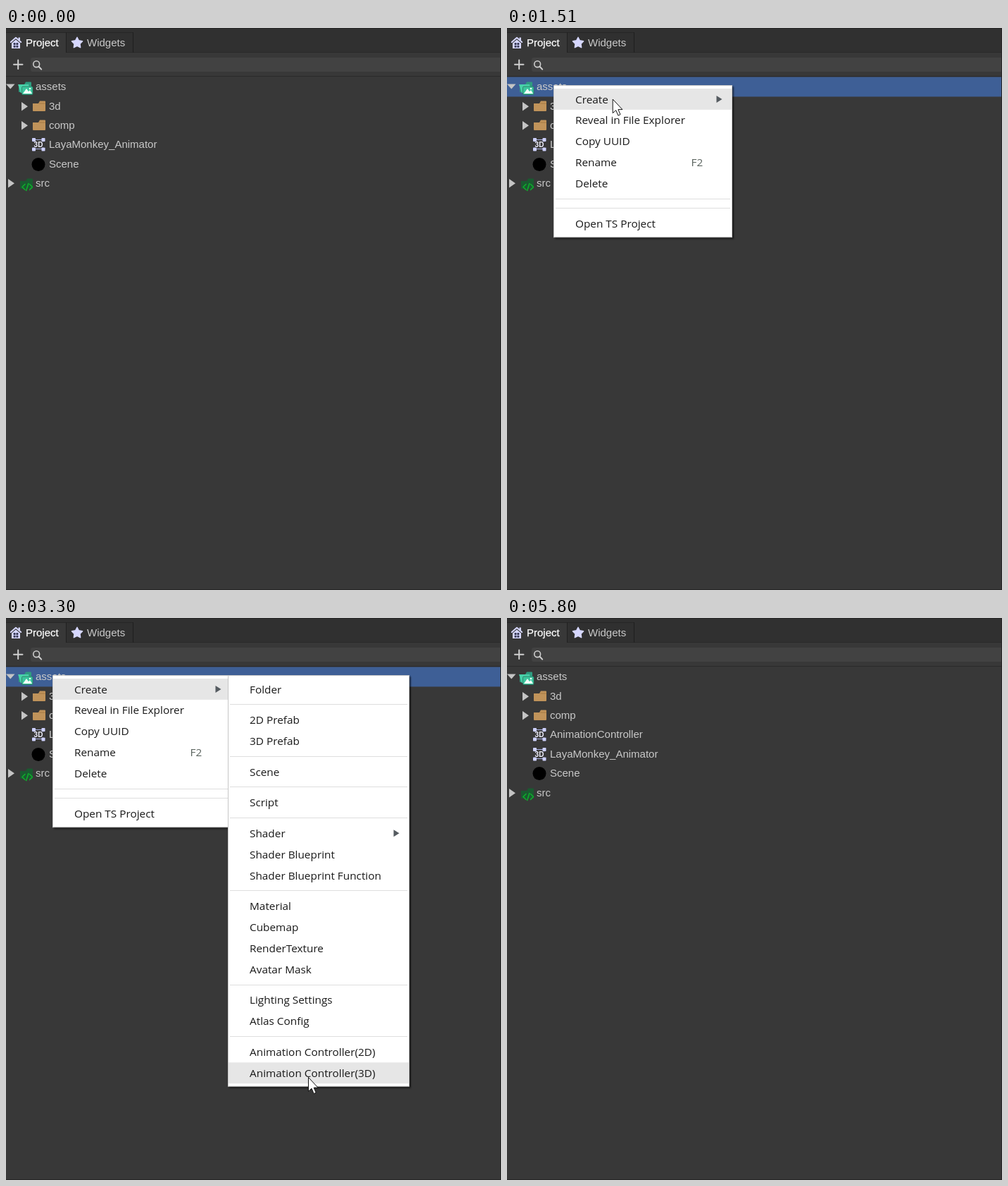
An HTML page for the animation above (6280 ms loop, 703x797 px).

```html
<!DOCTYPE html>
<html lang="en">
<head>
<meta charset="utf-8">
<title>Create an animation controller</title>
<style>
  html, body { margin: 0; width: 100%; height: 100%; overflow: hidden; background: #383838; }
  svg { display: block; }
  .ui { font: 15px "Liberation Sans", Arial, sans-serif; fill: #c9c9c9; }
  .ui .active { fill: #fff; stroke: #fff; stroke-width: .25px; }
  .ui .badge { font-size: 10px; font-weight: bold; fill: #f0f0ff; text-anchor: middle; }
  .menu text { font: 15.35px "Open Sans", "Noto Sans", sans-serif; fill: #1a1a1a; }
  .menu .key { fill: #5b645f; }
  .box { fill: #fff; stroke: #c6c6c6; filter: drop-shadow(2px 2px 1px rgba(0, 0, 0, .55)); }
  .lit { fill: #e6e6e6; }
</style>
</head>
<body>
<svg id="stage" width="703" height="797" viewBox="0 0 703 797"></svg>
<script>
const LOOP = 6280, STEP = 70;
const TOP = 70, ROW = 27.4, ITEM = 29.87, GAP = 13.75;
const LILAC = '#d6d7ff', PALE = '#cfcfcf', BLUE = '#3e5f96';
const stage = document.getElementById('stage');

// --- drawing helpers ---
const rect = (x, y, w, h, fill, extra = '') =>
  `<rect x="${x}" y="${y}" width="${w}" height="${h}" fill="${fill}" ${extra}/>`;
const path = (d, fill, extra = '') => `<path d="${d}" fill="${fill}" ${extra}/>`;
const line = (d, stroke, width) =>
  path(d, 'none', `stroke="${stroke}" stroke-width="${width}" stroke-linecap="round" stroke-linejoin="round"`);
const text = (x, y, s, extra = '') => `<text x="${x}" y="${y}" ${extra}>${s}</text>`;
const group = (s, extra = '') => `<g ${extra}>${s}</g>`;
// Four equal squares in a two by two block
const quad = (x, y, pitch, size, fill) => [0, 1, 2, 3].map(i =>
  rect(x + pitch * (i % 2), y + pitch * (i >> 1), size, size, fill, 'rx=".8"')).join('');

function starPath(cx, cy, r) {
  const pts = Array.from({ length: 10 }, (_, i) => {
    const a = Math.PI * (i / 5 - .5), d = i % 2 ? r * .52 : r;
    return (cx + d * Math.cos(a)).toFixed(1) + ' ' + (cy + d * Math.sin(a)).toFixed(1);
  });
  return 'M' + pts.join('L') + 'Z';
}

// Icons sit relative to the vertical centre of their row.
const folder = (x, fill) => path(`M${x} -4h8l2 -3.5h7q1 0 1 1v12.5q0 1 -1 1h-16q-1 0 -1 -1z`, fill);
const icons = {
  assets: group(folder(18, '#2f9c80'), 'transform="translate(0 1)"') +
    path('M17 -3h15l3 12h-14z', '#48d3aa') +
    rect(22.5, 0, 15.5, 11.5, '#3bc59c', 'rx="1.5" stroke="#2c6f5f" stroke-width=".8"') +
    path('M24 10l5 -7 3 4 2 -2 3 5z', '#f2fffb') + '<circle cx="34" cy="3" r="1.3" fill="#f2fffb"/>',
  folder: folder(38, '#c0935a') + line('M47.5 -4h8', '#a67b45', 1),
  animator: line('M39.5 -6.5h13v13h-13z', '#a9aee0', 1.2) + quad(37, -9, 13.5, 5, '#cdd1ff') +
    rect(38, -3.7, 17, 8, '#383838') + text(46, 4, '3D', 'class="badge"'),
  scene: '<circle cx="46" cy="0.5" r="9.5" fill="#000"/>',
  src: group(folder(20, '#1a5a30'), 'transform="translate(0 1)"') +
    line('M27 1.5l-4 4 4 4M33.5 1.5l4 4 -4 4M31.8 0.5l-3 10', '#0fae2c', 1.6)
};

const arrowRight = x => path(`M${x} -6l9 6.2 -9 6.2z`, '#c4c4c4');
const arrowDown = path('M0 -3.5h12.5l-6.2 7z', '#c4c4c4');
const row = (i, icon, x, label, arrow = '') => group(arrow + icons[icon] + text(x, 5, label),
  `transform="translate(0 ${Math.round(TOP + ROW * (i + .5) - .5)})"`);
const tail = i => row(i, 'animator', 61, 'LayaMonkey_Animator') +
  row(i + 1, 'scene', 61, 'Scene') + row(i + 2, 'src', 42, 'src', arrowRight(3));

// --- context menus ---
function buildMenu(id, x, w, list) {
  let y = 86, body = '', lit = '';
  const items = [];
  for (const entry of list.split(',')) {
    if (entry === '-') {
      body += rect(x + 2.5, Math.round(y + GAP / 2 - .5), w - 5, 1, '#dedede');
      y += GAP;
      continue;
    }
    const [label, key] = entry.split('|'), mid = y + ITEM / 2, base = Math.round(mid + 5.6);
    lit += `<rect class="lit" x="${x + .5}" y="${y}" width="${w - 1}" height="${ITEM}"/>`;
    body += text(x + 30.5, base, label);
    if (key === '>') body += path(`M${x + w - 22} ${mid - 5}l8 5 -8 5z`, '#555b60');
    else if (key) body += text(x + 195, base, key, 'class="key"');
    items.push([y, y + ITEM]);
    y += ITEM;
  }
  const box = `<rect class="box" x="${x}" y="81.5" width="${w}" height="${y + 4 - 81.5}"/>`;
  return { id, items, svg: group(box + lit + body, `class="menu" id="${id}"`) };
}

const main = buildMenu('main', 66.5, 253,
  'Create|>,Reveal in File Explorer,Copy UUID,Rename|F2,Delete,-,-,Open TS Project');
const sub = buildMenu('sub', 315.5, 257,
  'Folder,-,2D Prefab,3D Prefab,-,Scene,-,Script,-,Shader|>,Shader Blueprint,' +
  'Shader Blueprint Function,-,Material,Cubemap,RenderTexture,Avatar Mask,-,' +
  'Lighting Settings,Atlas Config,-,Animation Controller(2D),Animation Controller(3D)');

// --- panel ---
const house = line('M6.8 20L14 13.8l7.2 6.2', LILAC, 2) + rect(17.5, 13.5, 2.5, 4, LILAC) +
  path('M8 21.5l6 -5 6 5v7.5h-12z', LILAC) + quad(10.6, 21, 3.8, 3, '#383a55');
const star = path(starPath(101, 21.2, 8), LILAC, `stroke="${LILAC}" stroke-width="1.4" stroke-linejoin="round"`);

const header = rect(0, 0, 703, 35, '#303030') + rect(0, 0, 703, 1, '#242424') +
  rect(0, 6, 180, 1, '#262626') + rect(0, 34, 703, 1, '#292929') +
  rect(0, 7, 85, 28, '#383838') + rect(85, 6, 1, 29, '#212121') + rect(180, 6, 1, 29, '#1f1f1f') +
  house + star + text(28, 26, 'Project', 'class="active"') + text(115, 26, 'Widgets') +
  line('M11 51.7h12.5M17.2 45.5v12.5', PALE, 2) + rect(35, 42, 670, 20, '#424242', 'rx="3"') +
  `<circle cx="43.2" cy="51.2" r="4.4" fill="none" stroke="${PALE}" stroke-width="1.6"/>` +
  line('M46.6 54.8l3.6 3.8', PALE, 2) + rect(0, 68, 703, 1, '#2a2a2a');

const rename = rect(0, 152, 57, 28, BLUE) + rect(57, 152, 646, 28, '#363636') +
  rect(0, 152, 703, 1, '#456bb0') + rect(0, 179, 703, 1, '#456bb0') + rect(62, 157.5, 132, 18.5, '#0b66d6');

stage.innerHTML = rect(0, 0, 703, 797, '#383838') + group(
  header + rect(0, TOP - .5, 703, ROW + .5, '#444', 'id="band"') +
  row(0, 'assets', 42, 'assets', arrowDown) +
  row(1, 'folder', 61, '3d', arrowRight(22)) +
  row(2, 'folder', 61, 'comp', arrowRight(22)) +
  group(tail(3), 'id="before"') +
  group(group(rename, 'id="rename"') +
    row(3, 'animator', 61, '<tspan id="fresh">AnimationController</tspan>') + tail(4), 'id="after"') +
  rect(702, 0, 1, 797, '#262626') + rect(0, 796, 703, 1, '#262626'), 'class="ui"') +
  main.svg + sub.svg +
  '<circle id="click" r="15"/>' +
  path('M.5 .5V20.2L5 16.2 8.2 23.6 11.3 22.2 8.2 15.1H14.2Z', '#fff', 'id="cursor" stroke="#111"');

// --- timeline ---
const ENTER = 330, PRESS = 1080, OPEN = 1230, SUBMENU = 1710, PICK = 3700,
  CLOSE = 3840, CREATED = 4050, COMMIT = 5240, LEAVE = 5800;

// Where the pointer is at key times; each leg slows towards its end.
const stops = [
  [ENTER, 690, 24], [900, 66, 82], [1300, 67, 82], [1780, 188, 109], [2110, 189, 109],
  [2390, 440, 128], [2600, 440, 371], [3300, 429, 651], [CLOSE, 429, 651],
  [4400, 367, 334], [4750, 486, 384], [5030, 490, 384], [5730, 611, 791]
];

function cursorAt(t) {
  const next = stops.findIndex(s => s[0] > t);
  if (next < 1) return (next ? stops[stops.length - 1] : stops[0]).slice(1);
  const [t0, x0, y0] = stops[next - 1], [t1, x1, y1] = stops[next];
  const k = Math.min(1, Math.floor((t - t0) / STEP + .1) * STEP / (t1 - t0));
  const e = 1 - (1 - k) ** 2;
  return [x0 + (x1 - x0) * e, y0 + (y1 - y0) * e];
}

const $ = id => document.getElementById(id);
const show = (el, on) => { el.style.display = on ? '' : 'none'; };
const light = (menu, test) =>
  $(menu.id).querySelectorAll('.lit').forEach((el, i) => show(el, test(menu.items[i], i)));

function render(t) {
  const within = (a, b) => t >= a && t < b;
  const [x, y] = cursorAt(t);
  const place = `translate(${x.toFixed(1)} ${y.toFixed(1)})`;
  const subOpen = within(SUBMENU, CLOSE), selected = within(OPEN, CREATED);
  const created = t >= CREATED, editing = within(CREATED, COMMIT), pressed = within(PRESS, OPEN);

  show($('cursor'), within(ENTER, LEAVE));
  $('cursor').setAttribute('transform', place);
  show($('click'), pressed || within(PICK, CLOSE));
  $('click').setAttribute('transform', place);
  $('click').setAttribute('fill', pressed ? 'rgba(255,0,0,.47)' : 'rgba(255,255,0,.47)');

  show($('band'), selected || (within(ENTER, OPEN) && y >= TOP));
  $('band').setAttribute('fill', selected ? BLUE : '#444');

  show($('main'), within(OPEN, CLOSE));
  show($('sub'), subOpen);
  light(main, ([a, b], i) => i === 0 && (subOpen || (y >= a && y < b)));
  light(sub, ([a, b]) => x > 316 && y >= a && y < b);

  show($('before'), !created);
  show($('after'), created);
  show($('rename'), editing);
  $('fresh').setAttribute('dx', editing ? 1 : 0);
  $('fresh').setAttribute('dy', editing ? 1 : 0);
  $('fresh').style.fill = editing ? '#fff' : '';
}

const start = performance.now();
function tick() {
  render((performance.now() - start) % LOOP);
  requestAnimationFrame(tick);
}
tick();
</script>
</body>
</html>
```
